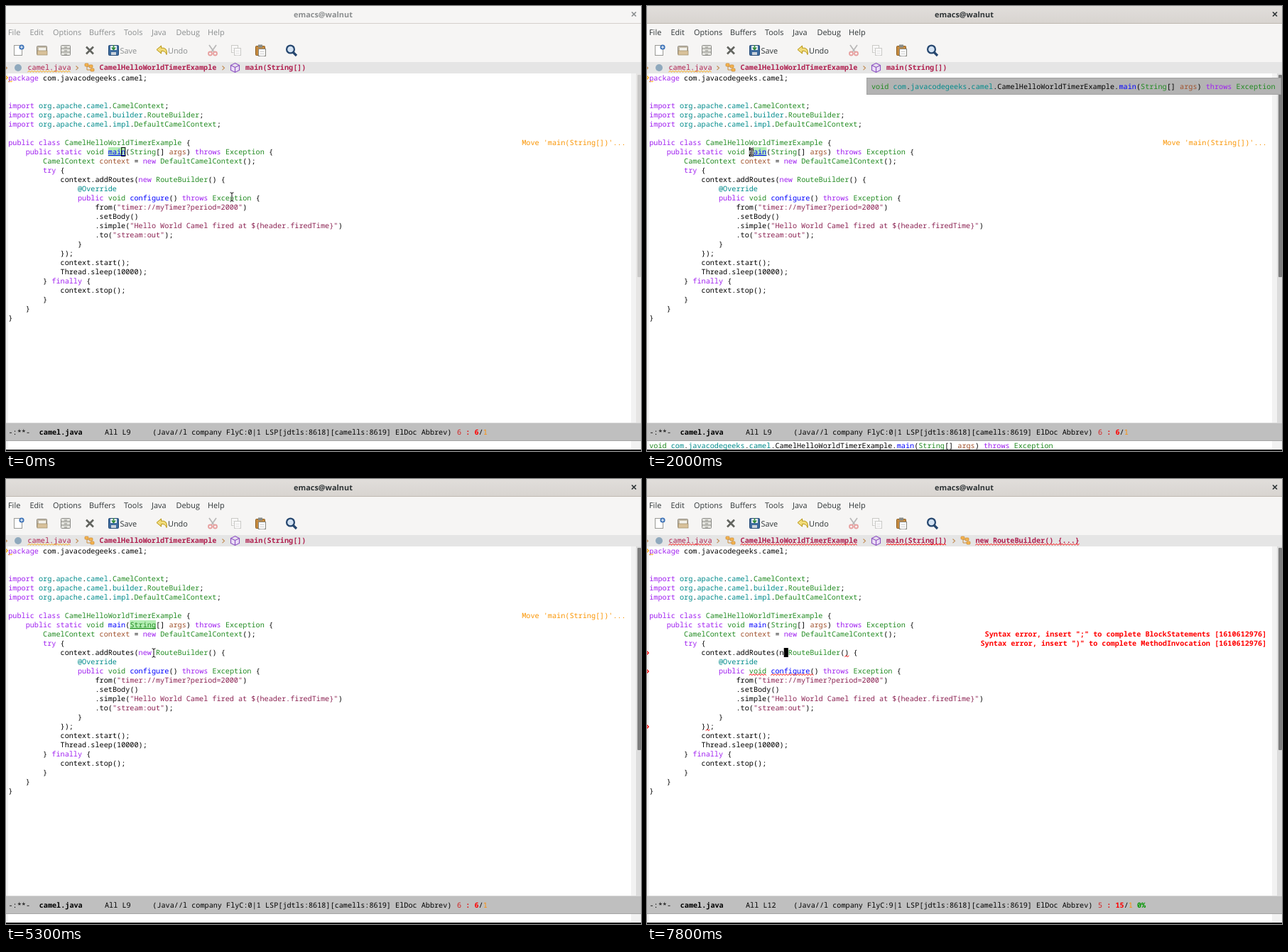
Animation, 894 px wide and 627 px high, one loop 8 s. Source, as an HTML page:

```html
<!DOCTYPE html>
<html lang="en">
<head>
<meta charset="utf-8">
<title>Editor session</title>
<style>
html, body { margin: 0; width: 100%; height: 100%; overflow: hidden; background: #fff; }
svg { display: block; }
text { white-space: pre; text-rendering: geometricPrecision; }
.mono { font: 10.19px "Noto Sans Mono", "DejaVu Sans Mono", monospace; }
.ui { font: 10.9px "Open Sans", "Noto Sans", sans-serif; }
.mono.b, .ui.b { font-weight: 700; }
</style>
</head>
<body>
<svg id="stage" width="894" height="627" viewBox="0 0 894 627"></svg>
<script>
const LOOP = 8000, CELL = 6.114, LEFT = 3.2, TOP = 95, ROW = 13;
const C = {
  keyword: '#a020f0', type: '#228b22', constant: '#008b8b', string: '#8b2252',
  variable: '#a0522d', func: '#0000ff', plain: '#000', lens: '#fa9400',
  error: '#ff0000', crumb: '#b0204f', warn: '#ffa800'
};

const LINES = `package com.javacodegeeks.camel;


import org.apache.camel.CamelContext;
import org.apache.camel.builder.RouteBuilder;
import org.apache.camel.impl.DefaultCamelContext;

public class CamelHelloWorldTimerExample {
    public static void main(String[] args) throws Exception {
        CamelContext context = new DefaultCamelContext();
        try {
            context.addRoutes(new RouteBuilder() {
                @Override
                public void configure() throws Exception {
                    from("timer://myTimer?period=2000")
                    .setBody()
                    .simple("Hello World Camel fired at \${header.firedTime}")
                    .to("stream:out");
                }
            });
            context.start();
            Thread.sleep(10000);
        } finally {
            context.stop();
        }
    }
}`.split('\n');
const EDIT_ROW = 11;

const TOKENS = new RegExp([
  '(?<string>"[^"]*")',
  '(?<keyword>\\b(?:package|import|public|class|static|try|new|throws|finally)\\b)',
  '(?<constant>@Override|(?<=import .*)\\b[a-z]\\w*)',
  '(?<variable>\\bargs\\b|\\bcontext(?= =))',
  '(?<func>\\b(?:main|configure)(?=\\())',
  '(?<type>\\bvoid\\b|\\b(?!Thread)[A-Z]\\w+)',
  '(?<plain>\\w+|[^\\w\\s"@]+)'
].join('|'), 'g');

const esc = s => s.replace(/&/g, '&amp;').replace(/</g, '&lt;').replace(/>/g, '&gt;');
const text = (x, y, s, fill = '#000', cls = 'mono', extra = '') =>
  `<text class="${cls}" x="${x}" y="${y}" fill="${fill}" ${extra}>${esc(s)}</text>`;
const rect = (x, y, w, h, fill, extra = '') =>
  `<rect x="${x}" y="${y}" width="${w}" height="${h}" fill="${fill}" ${extra}/>`;
const path = (d, stroke, width = 1, fill = 'none') =>
  `<path d="${d}" stroke="${stroke}" stroke-width="${width}" fill="${fill}"/>`;
const colX = col => LEFT + col * CELL;
const rowY = row => TOP + row * ROW;
const between = (t, a, b) => t >= a && t < b;

function runs(x, y, parts) {
  return parts.map(([s, fill, bold]) => {
    const out = text(x, y, s, fill, bold ? 'mono b' : 'mono');
    x += s.length * CELL;
    return out;
  }).join('');
}

function codeLine(line, row) {
  return [...line.matchAll(TOKENS)].map(m => {
    const kind = Object.keys(m.groups).find(k => m.groups[k] !== undefined);
    return text(colX(m.index), rowY(row) + 10, m[0], C[kind]);
  }).join('');
}

function wave(x, y, width, color) {
  let d = `M${x} ${y + 1}`;
  for (let i = 2; i <= width; i += 2) d += `L${x + i} ${y + (i % 4 ? -0.6 : 1)}`;
  return path(d, color);
}

const fringeMark = (y, color) => path(`M-1 ${y - 3}L2.3 ${y}L-1 ${y + 3}`, color, 1.2);
const chevron = (x, color = '#c08a50') => path(`M${x - 1.5} 84.5l3 2.8l-3 2.8`, color, 1.1);
const treeIcon = x =>
  path(`M${x + 3} 84v6h5M${x + 3} 85h5`, '#c98b3c') +
  [[0, 81], [6, 83], [8, 88]].map(([dx, y]) =>
    rect(x + dx, y, 5, 4, '#f5b552', 'rx="1" stroke="#c8842a" stroke-width=".7"')).join('');

const page = (x, y, w, h) => rect(x, y, w, h, '#fff', 'stroke="#85857f"') +
  path(`M${x + 2} ${y + 4}h${w - 4}m0 3h${4 - w}m0 3h${w - 4}`, '#bbb', 0.8);

function toolbar(focused, editable) {
  const label = focused ? '#2e3436' : '#8b8e8f';
  const dim = editable ? 1 : 0.38;
  return rect(11.5, 55.5, 11, 14, '#fff', 'stroke="#9a9a96"') +
    '<circle cx="22" cy="58" r="3.6" fill="#3f74b8"/>' + path('M20 58h4m-2 -2v4', '#fff', 1) +
    rect(43.5, 56.5, 14, 12, '#c4bba8', 'rx="1" stroke="#908b80"') +
    rect(46, 59, 10, 5, '#f4f2ec') + rect(44, 63, 14, 6, '#d8c19a', 'stroke="#9c8a68" stroke-width=".7"') +
    rect(77.5, 55.5, 13, 14, '#e4e4df', 'rx="1" stroke="#8a8a86"') +
    path('M78 60h12m-12 5h12M82 58h4m-4 5h4m-4 5h4', '#85857f') +
    path('M113 57.5l10 10m0 -10l-10 10', '#62645f', 2.6) +
    rect(144.5, 55.5, 14, 14, '#3d6b9e', 'rx="1" stroke="#254a75"') +
    rect(147, 56, 9, 6, '#e9eef4') + rect(148, 65, 7, 4, '#cbd3db') +
    path('M151.5 55v6m-2.5 -2.5l2.5 3l2.5 -3', '#2f8b3a', 1.6) +
    text(160.5, 66.5, 'Save', label, 'ui') +
    path('M212 61.5l6.5 -5.5v3.2c6 -.7 9 2.5 7.5 9.3c-1.2 -4 -3.5 -5.2 -7.5 -5v3.5z', '#b89410', 1, '#f1dc7c') +
    text(228, 66.5, 'Undo', label, 'ui') +
    `<g opacity="${dim}">` +
      path('M286 55l7 10M296 55l-7 10', '#555', 1.7) +
      '<g fill="none" stroke="#d01818" stroke-width="1.8"><circle cx="287.5" cy="67" r="2.5"/><circle cx="294.5" cy="67" r="2.5"/></g>' +
      page(317.5, 55.5, 9, 10) + page(321.5, 59.5, 9, 10) +
    '</g>' +
    rect(351.5, 56.5, 13, 13, '#c68a3d', 'rx="1" stroke="#8b5e23"') +
    rect(355, 54.5, 6, 4, '#888a85') + page(355.5, 60.5, 10, 10) +
    path('M404 65l5 5', '#26476f', 3.2) +
    '<circle cx="400.5" cy="61" r="5.4" fill="#d3e2f2" stroke="#26476f" stroke-width="2.3"/>';
}

function chrome(focused) {
  const ink = focused ? '#2e3436' : '#8b8e8f';
  const menu = { File: 3, Edit: 33.5, Options: 66, Buffers: 117, Tools: 166, Java: 205, Debug: 239.5, Help: 284 };
  return '<linearGradient id="bar" x2="0" y2="1"><stop stop-color="#e1dedb"/><stop offset="1" stop-color="#d8d4d0"/></linearGradient>' +
    rect(0, 0, 894, 79, '#f6f5f4') +
    rect(0, 0, 894, 24, focused ? 'url(#bar)' : '#f6f5f4') + rect(0, 24, 894, 1, focused ? '#bfb8b1' : '#d5d0cc') +
    text(446.5, 16, 'emacs@walnut', ink, 'ui b', 'text-anchor="middle"') +
    path('M881 8.5l6 6m0 -6l-6 6', ink, 1.7) +
    Object.entries(menu).map(([s, x]) => text(x, 40.5, s, ink, 'ui')).join('');
}

function breadcrumbs(inner, broken) {
  const items = [[30.5, 'camel.java'], [131.6, 'CamelHelloWorldTimerExample'], [337, 'main(String[])']];
  let out = rect(0, 79, 894, 16, '#e5e5e5') + chevron(0) +
    '<circle cx="17" cy="87" r="5" fill="#8fa9bd"/>' +
    chevron(100) + treeIcon(111) + chevron(306) +
    path('M322.5 80.5l6 3v7l-6 3l-6 -3v-7zM316.5 83.5l6 3l6 -3M322.5 86.5v7', '#8a4fc0', 1.1, '#eadcf6') +
    (inner ? chevron(432) + treeIcon(442) : '');
  if (inner) items.push([462.5, 'new RouteBuilder() {...}']);
  items.forEach(([x, s], i) => {
    out += text(x, 90, s, C.crumb, i ? 'mono b' : 'mono');
    if (broken || !i) out += wave(x, 92, s.length * CELL, broken ? C.error : C.warn);
  });
  return out;
}

function modeLine(t, broken) {
  const line = t < 5500 ? 'L9' : 'L12';
  const pending = broken ? '5' : t < 6300 ? '6' : t < 6700 ? '7' : '8';
  return rect(0, 587, 894, 26, '#bfbfbf') + rect(0, 587, 894, 1, '#d8d8d8') + rect(0, 612, 894, 1, '#a5a5a5') +
    text(3.5, 604, '-:**-') + text(46.7, 604, 'camel.java', '#000', 'mono b') +
    text(139, 604, 'All ' + line) +
    text(206.3, 604, `(Java//l company FlyC:${broken ? 9 : 0}|1 LSP[jdtls:8618][camells:8619] ElDoc Abbrev)`) +
    runs(635, 604, [
      [pending, '#d32020'], [' : ', '#e01010', 1], [broken ? '15' : '6', '#f00', 1], ['/', '#000'],
      ['1', '#ff8c00'], [t < 6700 ? '' : ' 0%', '#009600', 1]
    ]);
}

const SIGNATURE = [
  ['void ', C.type], ['com', C.constant], ['.', '#000'], ['javacodegeeks', C.constant], ['.', '#000'],
  ['camel', C.constant], ['.CamelHelloWorldTimerExample.', '#000'], ['main', C.func], ['(', '#000'],
  ['String', C.type], ['[] ', '#000'], ['args', C.variable], [') ', '#000'], ['throws ', C.keyword], ['Exception', C.type]
];

function sideNotes(t) {
  const note = (row, s, bold) => text(873 - s.length * CELL, rowY(row) + 10, s,
    bold ? C.error : C.lens, bold ? 'mono b' : 'mono');
  if (t < 1300 || between(t, 1800, 3900) || between(t, 4500, 5400)) return note(7, "Move 'main(String[])'...");
  if (between(t, 6100, 7300)) return note(8, 'Extract to local variable') +
    note(9, 'Extract to local variable (replace all occurrences)') + note(10, 'Extract to field');
  if (t >= 7700) return note(9, 'Syntax error, insert ";" to complete BlockStatements [1610612976]', true) +
    note(10, 'Syntax error, insert ")" to complete MethodInvocation [1610612976]', true);
  return '';
}

function highlight(t) {
  const word = t < 3900 ? [23, 4, C.func] : between(t, 5300, 5400) ? [28, 6, C.type] : null;
  if (!word) return ['', ''];
  const [col, len, ink] = word, x = colX(col), w = len * CELL;
  return [rect(x, rowY(8), w, ROW, '#b4eeb4'), rect(x, rowY(8) + 11, w, 1, ink)];
}

function cursor(t, lines) {
  let col = 26, row = 8;
  if (t >= 1400) col = 23;
  if (t >= 3900) col = 32;
  if (t >= 5400) { row = EDIT_ROW; col = t < 6300 ? 33 : t < 6700 ? 32 : 31; }
  if (between(t, 2100, 2800) || between(t, 4400, 5400)) return '';
  const x = colX(col), y = rowY(row);
  if (t < 1300) return rect(x + 0.5, y + 0.5, CELL - 1, ROW - 1, 'none', 'stroke="#000"');
  return rect(x, y, CELL, ROW, '#000') + text(x, y + 10, lines[row][col], '#fff');
}

// Each move: start time, number of 100 ms steps, end point.
const MOVES = [
  [200, 6, 150, 198], [900, 3, 147.5, 206], [3100, 1, 167, 206], [3200, 5, 202, 206],
  [4300, 6, 208, 245], [5700, 2, 224, 217]
];

function pointer(t) {
  if (t >= 7600) return '';
  let x = 318, y = 269;
  for (const [start, steps, toX, toY] of MOVES) {
    if (t < start) break;
    const k = Math.min(1, ((t - start) / 100 + 1) / steps);
    x += (toX - x) * k;
    y += (toY - y) * k;
  }
  const d = `M${x - 2.5} ${y - 6}h1.5l1 1l1 -1h1.5M${x} ${y - 5}v10M${x - 2.5} ${y + 6}h1.5l1 -1l1 1h1.5`;
  return path(d, '#fff', 2.4) + path(d, '#111', 1);
}

function errors() {
  const spans = [[EDIT_ROW, 45, 1], [13, 23, 4], [13, 28, 10], [19, 13, 1]];
  return spans.map(([row, col, len]) => wave(colX(col), rowY(row) + 11.5, len * CELL, C.error)).join('') +
    [EDIT_ROW, 13, 19].map(row => fringeMark(rowY(row) + 7, C.error)).join('');
}

function scene(t) {
  const focused = t >= 1300, broken = t >= 7600;
  const lines = LINES.slice();
  if (t >= 6300) lines[EDIT_ROW] = lines[EDIT_ROW].replace('new', t < 6700 ? 'ne' : 'n');
  const [mark, underline] = highlight(t);
  let out = rect(0, 0, 894, 627, '#fff') +
    rect(0, 95, 3, 492, '#f2f2f2') + rect(880, 95, 7, 492, '#f2f2f2') +
    chrome(focused) +
    toolbar(focused, between(t, 3900, 4100) || between(t, 5400, 5500)) +
    breadcrumbs(t >= 6300, broken) +
    rect(887, 95, 7, 492, focused ? '#dcdcdc' : '#e6e5e4') +
    rect(889, 97, 5, 285, focused ? '#7e7e7e' : '#c9c8c7', 'rx="1"') +
    mark + lines.map(codeLine).join('') + underline +
    fringeMark(101, C.warn) + wave(3, 106, 6, C.warn) +
    sideNotes(t) + cursor(t, lines) + modeLine(t, broken);
  if (broken) out += errors();
  if (between(t, 2000, 3100)) out += runs(LEFT, 622.5, SIGNATURE);
  out += rect(0, 613, 3, 12, '#f2f2f2') + rect(880, 613, 14, 12, '#f2f2f2') + rect(0, 625, 894, 2, '#111');
  if (between(t, 1700, 3900)) {
    out += rect(309.5, 101.5, 583, 23, '#b3b3b3', 'stroke="#a2a2a2"') + runs(316, 117, SIGNATURE);
  }
  return out + pointer(t);
}

const stage = document.getElementById('stage');
const begin = performance.now();
let shown = -1;

function tick() {
  const t = Math.floor((performance.now() - begin) % LOOP / 100) * 100;
  if (t !== shown) {
    stage.innerHTML = scene(t);
    shown = t;
  }
  requestAnimationFrame(tick);
}
tick();
</script>
</body>
</html>
```
